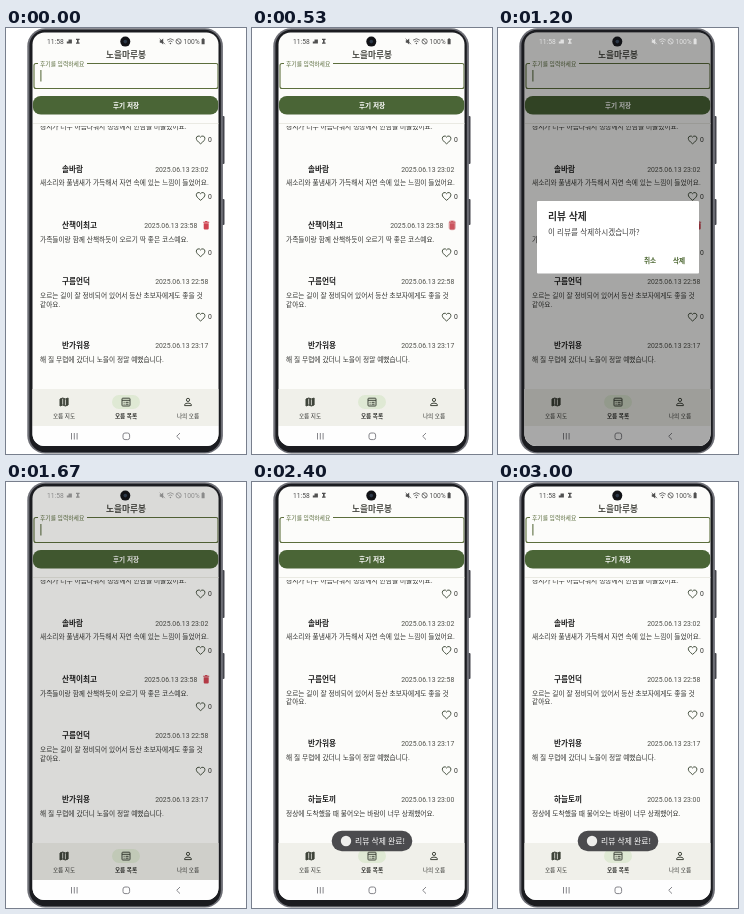
These frames come from a looping animation (240x426 px, 3.07 s). An HTML page:

```html
<!DOCTYPE html>
<html lang="ko">
<head>
<meta charset="utf-8">
<title>리뷰 삭제</title>
<style>
  html, body { margin: 0; width: 100%; height: 100%; overflow: hidden; background: #fff; }
  svg { display: block; width: 100vw; height: 100vh; }
  text { font-family: "Noto Sans CJK KR", "Noto Sans CJK", "Noto Sans KR", sans-serif; }
  .num { font-family: Roboto, sans-serif; }
</style>
</head>
<body>
<svg id="stage" viewBox="0 0 240 426">
  <defs>
    <clipPath id="screenClip"><rect x="26.5" y="4.5" width="186" height="413.5" rx="12"/></clipPath>
    <clipPath id="listClip"><rect x="27" y="98" width="186" height="241.5"/></clipPath>
    <path id="heart" d="M0 4.1C-3.2 1.6-4.3.2-4.3-1.4A2.3 2.3 0 0 1 0-2.5 2.3 2.3 0 0 1 4.3-1.4C4.3.2 3.2 1.6 0 4.1Z"
      fill="none" stroke="#3f4a38" stroke-width=".95"/>
    <path id="bin" d="M-3-3.6h1.6l.5-.7h1.8l.5.7H3v1h-6ZM-2.5-2h5v5.2q0 1-1 1h-3q-1 0-1-1Z" fill="#cf4350"/>
  </defs>

  <!-- phone body -->
  <g>
    <rect x="215.5" y="88" width="3" height="48" rx="1" fill="#44454c"/>
    <rect x="215.5" y="171" width="3" height="26" rx="1" fill="#44454c"/>
    <rect x="21.3" y=".2" width="195.6" height="425.4" rx="18" fill="#6d6e75"/>
    <rect x="23.4" y="1.8" width="191.4" height="422.4" rx="16" fill="#1b1c20"/>
  </g>

  <g clip-path="url(#screenClip)">
    <rect x="26" y="4" width="188" height="415" fill="#fcfcfa"/>
    <g id="header"></g>

    <!-- input -->
    <path d="M32 35.5H30Q28 35.5 28 37.5V58.5Q28 60.5 30 60.5H210Q212 60.5 212 58.5V37.5Q212 35.5 210 35.5H81" fill="none" stroke="#5c6e3c" stroke-width="1.1"/>
    <rect id="cursor" x="34.4" y="42" width="1" height="11.5" fill="#4f6331"/>

    <!-- save button -->
    <rect x="26.8" y="68" width="185.6" height="18.6" rx="8" fill="#4a6536"/>
    <path d="M27 95.5H213" stroke="#e6e6de" stroke-width=".8"/>
    <g id="labels"></g>

    <g id="list" clip-path="url(#listClip)"></g>

    <!-- tabs -->
    <rect x="26" y="361" width="188" height="37" fill="#f0f0ea"/>
    <rect x="106" y="367" width="28" height="14" rx="7" fill="#dfe9d4"/>
    <g fill="none" stroke="#3f443a" stroke-width="1">
      <path d="M54 371l2.7-1 2.7 1 2.7-1v7l-2.7 1-2.7-1-2.7 1Z" fill="#3f443a"/>
      <path d="M56.7 370.8v5.8M59.4 371.4v5.8" stroke="#f0f0ea" stroke-width=".8"/>
      <rect x="116" y="370.2" width="8" height="7.8" rx=".8"/>
      <path d="M116 372.3h8M117.6 374.3h1M119.6 374.3h3M117.6 376.2h1M119.6 376.2h3"/>
      <circle cx="182" cy="371.9" r="1.6"/>
      <path d="M178.6 377.6v-.7q0-1.8 3.4-1.8t3.4 1.8v.7Z"/>
    </g>
    <g id="tabs"></g>

    <!-- system keys -->
    <rect x="26" y="398" width="188" height="21" fill="#fefefe"/>
    <g fill="none" stroke="#85858a" stroke-width="1">
      <path d="M65.5 405v6.5M68.3 405v6.5M71.1 405v6.5"/>
      <rect x="117" y="405" width="6.6" height="6.6" rx="2"/>
      <path d="M174 405l-3.3 3.3 3.3 3.3"/>
    </g>

    <rect id="scrim" x="26" y="4" width="188" height="394"/>
    <rect id="keyScrim" x="26" y="398" width="188" height="21"/>

    <!-- status bar -->
    <g id="status" fill="currentColor">
      <path d="M60.8 15.6v-2.2h1.7v-2h3.4v4.2ZM70 10.7h3.6v1.2h-1v2.6h1v1.2H70v-1.2h1v-2.6h-1Z"/>
      <path d="M153.8 12.3h1.4l2-1.7v5.8l-2-1.7h-1.4Z"/>
      <path d="M153.6 10.6l5.4 5.6" fill="none" stroke="currentColor" stroke-width=".7"/>
      <path d="M161 12.2q3.4-3 6.8 0M162.4 13.8q2-1.8 4 0" fill="none" stroke="currentColor" stroke-width=".8"/>
      <circle cx="164.4" cy="15.5" r=".8"/>
      <g fill="none" stroke="currentColor" stroke-width=".8"><circle cx="172.6" cy="13.4" r="2.6"/><path d="M170.8 11.6l3.6 3.6"/></g>
      <path d="M195.6 10.9h.8v-.7h1.4v.7h.8v5.4h-3Z"/>
    </g>

    <g id="dialog">
      <rect x="39" y="173" width="162" height="72.5" rx="1" fill="#fff"/>
    </g>

    <g id="toast">
      <rect x="79.7" y="348.8" width="80.6" height="20.4" rx="10.2" fill="#4b4b4e"/>
      <circle cx="94" cy="359" r="5.2" fill="#eeeeec"/>
    </g>
  </g>
  <circle cx="119.3" cy="13.6" r="5" fill="#111216"/>
  <circle cx="119.3" cy="13.6" r="1.8" fill="#2c3848"/>
</svg>

<script>
const NS = "http://www.w3.org/2000/svg";
const LOOP = 3070;
const $ = id => document.getElementById(id);

function add(parent, tag, attrs) {
  const el = document.createElementNS(NS, tag);
  for (const k in attrs) el.setAttribute(k, attrs[k]);
  parent.appendChild(el);
  return el;
}

// y is the optical middle of the line
function label(parent, str, x, y, size, fill, more = {}) {
  const el = add(parent, "text", { x, y: y + size * 0.37, "font-size": size, fill, ...more });
  el.textContent = str;
  return el;
}

const MID = { "text-anchor": "middle" };
const END = { "text-anchor": "end" };
const BOLD = { "font-weight": 700 };
const INK = "#30312e";

label($("header"), "노을마루봉", 120, 26.3, 8.7, "#4c4d47", { ...MID, ...BOLD });
label($("labels"), "후기를 입력하세요", 34, 35.5, 5.8, "#586a3a");
label($("labels"), "후기 저장", 120, 77.4, 6.6, "#fff", { ...MID, ...BOLD });

["오름 지도", "오름 목록", "나의 오름"].forEach((s, i) =>
  label($("tabs"), s, 58 + 62 * i, 388.3, 5.6, INK, { ...MID, ...(i === 1 ? BOLD : {}) }));

label($("status"), "11:58", 41, 13.5, 6.7, "currentColor", { class: "num" });
label($("status"), "100%", 177.5, 13.5, 6.7, "currentColor", { class: "num" });

label($("dialog"), "리뷰 삭제", 50, 188, 9.8, "#303030", BOLD);
label($("dialog"), "이 리뷰를 삭제하시겠습니까?", 50, 204, 7.6, "#444");
label($("dialog"), "취소", 152, 233, 6.6, "#4a652f", { ...MID, ...BOLD });
label($("dialog"), "삭제", 181, 233, 6.6, "#4a652f", { ...MID, ...BOLD });
label($("toast"), "리뷰 삭제 완료!", 103, 359, 7.8, "#fff");

const reviews = [
  { y: 84.5, lines: ["경치가 너무 아름다워서 정상에서 한참을 머물렀어요."] },
  { y: 141, name: "솔바람", time: "23:02", lines: ["새소리와 풀냄새가 가득해서 자연 속에 있는 느낌이 들었어요."] },
  { y: 197.3, name: "산책이최고", time: "23:58", mine: true, lines: ["가족들이랑 함께 산책하듯이 오르기 딱 좋은 코스예요."] },
  { y: 253.5, name: "구름언덕", time: "22:58", lines: ["오르는 길이 잘 정비되어 있어서 등산 초보자에게도 좋을 것", "같아요."] },
  { y: 317.5, name: "반가워용", time: "23:17", lines: ["해 질 무렵에 갔더니 노을이 정말 예뻤습니다."] },
  { y: 373.7, name: "하늘토끼", time: "23:00", lines: ["정상에 도착했을 때 불어오는 바람이 너무 상쾌했어요."] }
];

let ripple;
function addReview(r) {
  const g = r.el = add($("list"), "g", { transform: `translate(0 ${r.y})` });
  if (r.name) {
    label(g, r.name, 56, 0, 7.6, "#222", BOLD);
    label(g, "2025.06.13 " + r.time, r.mine ? 191.3 : 202.3, 0, 6.85, "#50514b", { ...END, class: "num" });
  }
  r.lines.forEach((s, i) => label(g, s, 34, 14 + 8.6 * i, 6.69, INK));
  const foot = 27.2 + 8.2 * (r.lines.length - 1);
  add(g, "use", { href: "#heart", x: 194.6, y: foot });
  label(g, "0", 202, foot, 6.8, INK, { class: "num" });
  if (r.mine) {
    add(g, "use", { href: "#bin", x: 200.2, y: 0 });
    ripple = add(g, "rect", { x: 196.6, y: -5, width: 7.2, height: 10, rx: 3, fill: "#c8666c" });
  }
}
reviews.forEach(addReview);

const clamp = v => Math.min(1, Math.max(0, v));
const ramp = (t, from, to) => clamp((t - from) / (to - from));
const pulse = (t, a, b, c, d) => ramp(t, a, b) * (1 - ramp(t, c, d));
const ease = p => (1 - Math.cos(Math.PI * p)) / 2;

const CLOSE = 1600;
const SHIFT = 56.2;

function render(t) {
  // closing the dialog restarts the caret's blink
  const blink = t < CLOSE ? t : t - CLOSE;
  $("cursor").style.opacity = blink % 1000 < 500 ? 1 : 0;

  ripple.style.opacity = 0.5 * pulse(t, 440, 520, 600, 760);

  const dim = pulse(t, 700, 850, CLOSE, CLOSE + 120);
  const open = pulse(t, 720, 850, CLOSE - 10, CLOSE + 60);
  $("scrim").style.opacity = 0.34 * dim;
  $("keyScrim").style.opacity = 0.34 * open;
  $("dialog").style.opacity = open;
  const c = Math.round(80 + 145 * dim);
  $("status").style.color = `rgb(${c},${c},${c})`;

  const fade = 1 - ramp(t, 1800, 1920);
  const move = SHIFT * ease(ramp(t, 1920, 2170));
  reviews.forEach((r, i) => {
    if (r.mine) r.el.style.opacity = fade;
    else if (i > 2) r.el.setAttribute("transform", `translate(0 ${r.y - move})`);
  });

  $("toast").style.opacity = ramp(t, 1860, 2010);
}

const start = performance.now();
function tick() {
  render((performance.now() - start) % LOOP);
  requestAnimationFrame(tick);
}
tick();
</script>
</body>
</html>
```
